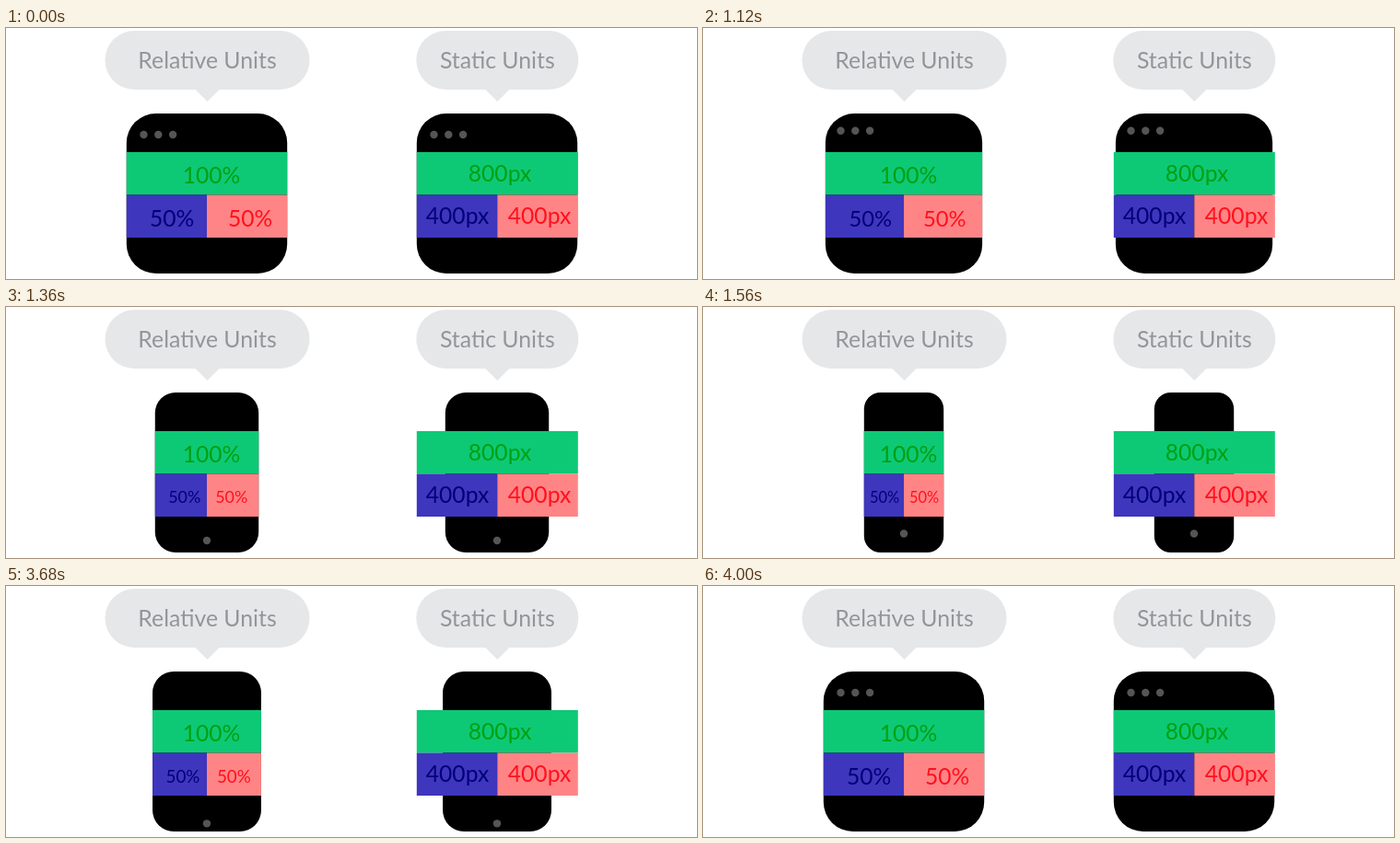
Write an HTML page with a canvas that moves like this. It is 750 by 273 pixels and loops after 5.04 s.

```html
<!DOCTYPE html>
<html lang="en">
<head>
<meta charset="utf-8">
<title>Relative and static units</title>
<style>
  html, body { margin: 0; width: 100%; height: 100%; overflow: hidden; background: #fff; }
  canvas { display: block; }
</style>
</head>
<body>
<canvas id="stage" width="750" height="273"></canvas>
<script>
const ctx = document.getElementById('stage').getContext('2d');
const LOOP = 5040, STEP = 40, MOVE = 520;
const LEFT = 218, RIGHT = 533, FONT = 24.6;
const GREEN = '#0dc976', BLUE = '#3e36bd', PINK = '#ff8486';
const DARK_GREEN = '#00a010', NAVY = '#000078', RED = '#ff101c', GRAY = '#555';

const mix = (a, b, k) => a + (b - a) * k;
const ease = t => t < 0.5 ? 2 * t * t : 1 - 2 * (1 - t) ** 2;
const ramp = (time, start) => ease(Math.min(1, Math.max(0, (time - start) / MOVE)));

function rect(color, x, y, w, h) {
  ctx.fillStyle = color;
  ctx.fillRect(x, y, w, h);
}

function dot(x, y) {
  ctx.fillStyle = GRAY;
  ctx.beginPath();
  ctx.arc(x, y, 4.2, 0, Math.PI * 2);
  ctx.fill();
}

// Text centred on x, with its capitals centred on y
function label(text, x, y, color, size = FONT) {
  ctx.font = `${size}px Lato, sans-serif`;
  ctx.textAlign = 'center';
  ctx.fillStyle = color;
  ctx.fillText(text, x, y + size * 0.36);
}

function bubble(text, x, width, textY) {
  ctx.fillStyle = '#e6e7e9';
  ctx.beginPath();
  ctx.roundRect(x - width / 2, 3, width, 64, 32);
  ctx.fill();
  ctx.beginPath();
  ctx.moveTo(x - 14, 66);
  ctx.lineTo(x + 14, 66);
  ctx.lineTo(x, 80);
  ctx.fill();
  label(text, x, textY, '#939598', 24.8);
}

// Black screen; the window dots leave at the top as the home button rises
function device(x, half, shape, detail) {
  ctx.save();
  ctx.beginPath();
  ctx.roundRect(x - half, 93, half * 2, 174, mix(32, 18, shape));
  ctx.fillStyle = '#000';
  ctx.fill();
  ctx.clip();
  for (let i = 0; i < 3; i++) dot(x - 68.5 + i * 15.8, 116 - 40 * detail);
  dot(x, 286.5 - 40 * detail);
  ctx.restore();
}

function blocks(x, half) {
  rect(GREEN, x - half, 135, half * 2, 46.5);
  rect(BLUE, x - half, 181.5, half, 46.5);
  rect(PINK, x, 181.5, half, 46.5);
}

function draw(time) {
  const shape = ramp(time, 1040) - ramp(time, 3460);
  const detail = ramp(time, 1000) - ramp(time, 3480);
  const half = mix(87.2, 43.2, shape);
  const small = mix(FONT, 16.4, detail);

  rect('#fff', 0, 0, 750, 273);
  bubble('Relative Units', LEFT + 0.5, 222, 35.5);
  bubble('Static Units', RIGHT + 0.3, 176, 35);

  device(LEFT, half, shape, detail);
  blocks(LEFT, half);
  label('100%', 223, 160, DARK_GREEN);
  label('50%', mix(180, 197, detail), 207, NAVY, small);
  label('50%', mix(265, 240, detail), 207, RED, small);

  device(RIGHT, half, shape, detail);
  blocks(RIGHT + 0.3, 87.5);
  label('800px', 536, 158.5, DARK_GREEN);
  label('400px', 490, 204.5, NAVY);
  label('400px', 579, 204.5, RED);
}

const begin = performance.now();
function frame() {
  const time = (performance.now() - begin) % LOOP;
  draw(Math.floor(time / STEP) * STEP);
  requestAnimationFrame(frame);
}
frame();
</script>
</body>
</html>
```
